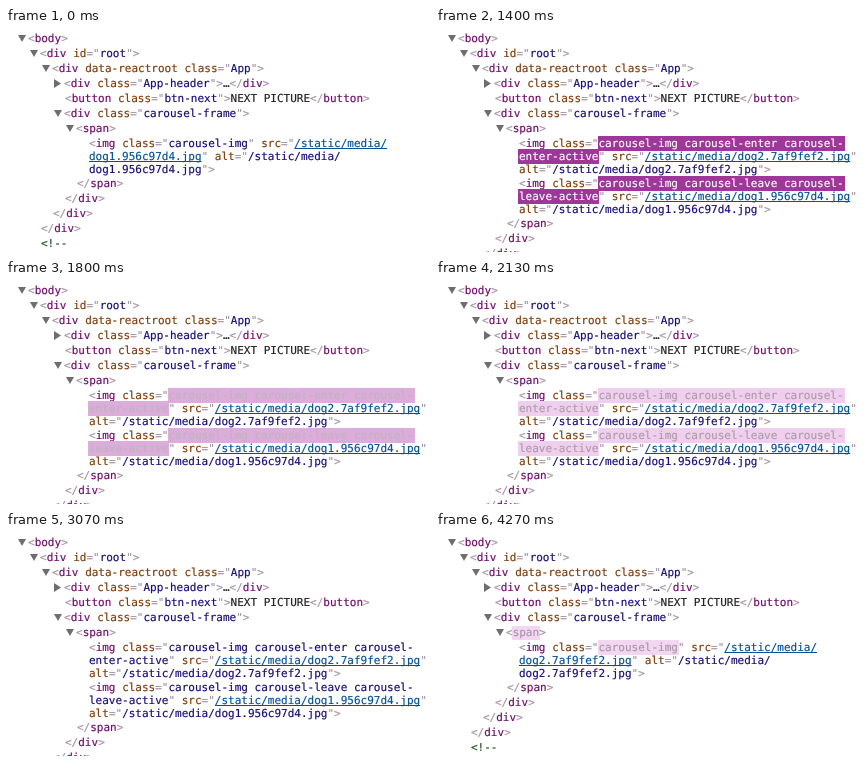
Write an HTML page that moves like this. It is 424x224 px and loops after 4.34 s.

```html
<!DOCTYPE html>
<html lang="en">
<head>
<meta charset="utf-8">
<title>DOM inspector</title>
<style>
  html, body { margin: 0; width: 100%; height: 100%; overflow: hidden; background: #fff; }

  #stage {
    position: relative; width: 424px; height: 224px; overflow: hidden;
    font: 11px/13px "DejaVu Sans Mono", Menlo, monospace;
    text-rendering: geometricPrecision;
    -webkit-text-stroke: .18px;
    color: rgb(168, 148, 166);
  }
  #head { position: absolute; top: 4px; left: 0; }
  #view { position: absolute; top: 94px; left: 0; width: 424px; height: 130px; overflow: hidden; }
  #strip { animation: switch 4340ms step-end infinite; }
  .panel { height: 130px; overflow: hidden; }

  /* one tree row; --d is its depth */
  p {
    position: relative; margin: 0; white-space: pre;
    padding: 0 0 2px calc(23px + 12px * var(--d));
  }
  .wrap { padding-bottom: 1px; }
  .open, .shut { left: -1px; }
  .open::before, .shut::before {
    content: ""; position: absolute; top: 3px; left: calc(13px + 12px * var(--d));
    width: 8px; height: 7px; background: #6e6e6e;
    clip-path: polygon(0 0, 100% 0, 50% 100%);
  }
  .shut::before {
    top: 2px; width: 7px; height: 9px;
    clip-path: polygon(0 0, 100% 50%, 0 100%);
  }

  b, i, s, u { font-weight: normal; font-style: normal; text-decoration: none; color: var(--own); }
  b { --own: rgb(112, 12, 106); }
  i { --own: rgb(128, 60, 10); }
  s { --own: rgb(24, 14, 120); }
  u { --own: rgb(5, 82, 152); text-decoration: underline; text-decoration-skip-ink: none; }
  .text { color: #222; }
  .note { color: rgb(38, 85, 38); }

  .flash {
    margin: -1px; padding: 1px;
    -webkit-box-decoration-break: clone; box-decoration-break: clone;
    animation: flash 4340ms cubic-bezier(0, 0, .2, 1) -2940ms infinite;
  }
  .late { animation-delay: -940ms; }

  /* panels change at 1400 ms and 3400 ms */
  @keyframes switch {
    0% { transform: translateY(0); }
    32.258% { transform: translateY(-130px); }
    78.341%, 100% { transform: translateY(-260px); }
  }
  /* 1400 ms highlight, then idle until the next loop */
  @keyframes flash {
    0% { background-color: rgb(158, 54, 153); color: #fff; }
    25.806% { background-color: rgb(245, 219, 244); color: inherit; }
    32.258%, 100% { background-color: transparent; color: var(--own); }
  }
</style>
</head>
<body>
<div id="stage">
  <div id="head">
    <p class="open" style="--d:0">&lt;<b>body</b>&gt;</p>
    <p class="open" style="--d:1">&lt;<b>div</b> <i>id</i>="<s>root</s>"&gt;</p>
    <p class="open" style="--d:2">&lt;<b>div</b> <i>data-reactroot</i> <i>class</i>="<s>App</s>"&gt;</p>
    <p class="shut" style="--d:3">&lt;<b>div</b> <i>class</i>="<s>App-header</s>"&gt;<span class="text">…</span>&lt;/<b>div</b>&gt;</p>
    <p style="--d:3">&lt;<b>button</b> <i>class</i>="<s>btn-next</s>"&gt;<span class="text">NEXT PICTURE</span>&lt;/<b>button</b>&gt;</p>
    <p class="open" style="--d:3">&lt;<b>div</b> <i>class</i>="<s>carousel-frame</s>"&gt;</p>
  </div>
  <div id="view">
    <div id="strip">
      <div class="panel">
        <p class="open" style="--d:4">&lt;<b>span</b>&gt;</p>
        <p class="wrap" style="--d:5">&lt;<b>img</b> <i>class</i>="<s>carousel-img</s>" <i>src</i>="<u>/static/media/
dog1.956c97d4.jpg</u>" <i>alt</i>="<s>/static/media/
dog1.956c97d4.jpg</s>"&gt;</p>
        <p style="--d:4">&lt;/<b>span</b>&gt;</p>
        <p style="--d:3">&lt;/<b>div</b>&gt;</p>
        <p style="--d:2">&lt;/<b>div</b>&gt;</p>
        <p style="--d:1">&lt;/<b>div</b>&gt;</p>
        <p class="note" style="--d:1">&lt;!--</p>
      </div>
      <div class="panel">
        <p class="open" style="--d:4">&lt;<b>span</b>&gt;</p>
        <p class="wrap" style="--d:5">&lt;<b>img</b> <i>class</i>="<s class="flash">carousel-img carousel-enter carousel-
enter-active</s>" <i>src</i>="<u>/static/media/dog2.7af9fef2.jpg</u>"
<i>alt</i>="<s>/static/media/dog2.7af9fef2.jpg</s>"&gt;</p>
        <p class="wrap" style="--d:5">&lt;<b>img</b> <i>class</i>="<s class="flash">carousel-img carousel-leave carousel-
leave-active</s>" <i>src</i>="<u>/static/media/dog1.956c97d4.jpg</u>"
<i>alt</i>="<s>/static/media/dog1.956c97d4.jpg</s>"&gt;</p>
        <p style="--d:4">&lt;/<b>span</b>&gt;</p>
        <p style="--d:3">&lt;/<b>div</b>&gt;</p>
        <p style="--d:2">&lt;/<b>div</b>&gt;</p>
      </div>
      <div class="panel">
        <p class="open" style="--d:4">&lt;<b class="flash late">span</b>&gt;</p>
        <p class="wrap" style="--d:5">&lt;<b>img</b> <i>class</i>="<s class="flash late">carousel-img</s>" <i>src</i>="<u>/static/media/
dog2.7af9fef2.jpg</u>" <i>alt</i>="<s>/static/media/
dog2.7af9fef2.jpg</s>"&gt;</p>
        <p style="--d:4">&lt;/<b>span</b>&gt;</p>
        <p style="--d:3">&lt;/<b>div</b>&gt;</p>
        <p style="--d:2">&lt;/<b>div</b>&gt;</p>
        <p style="--d:1">&lt;/<b>div</b>&gt;</p>
        <p class="note" style="--d:1">&lt;!--</p>
      </div>
    </div>
  </div>
</div>
</body>
</html>
```
